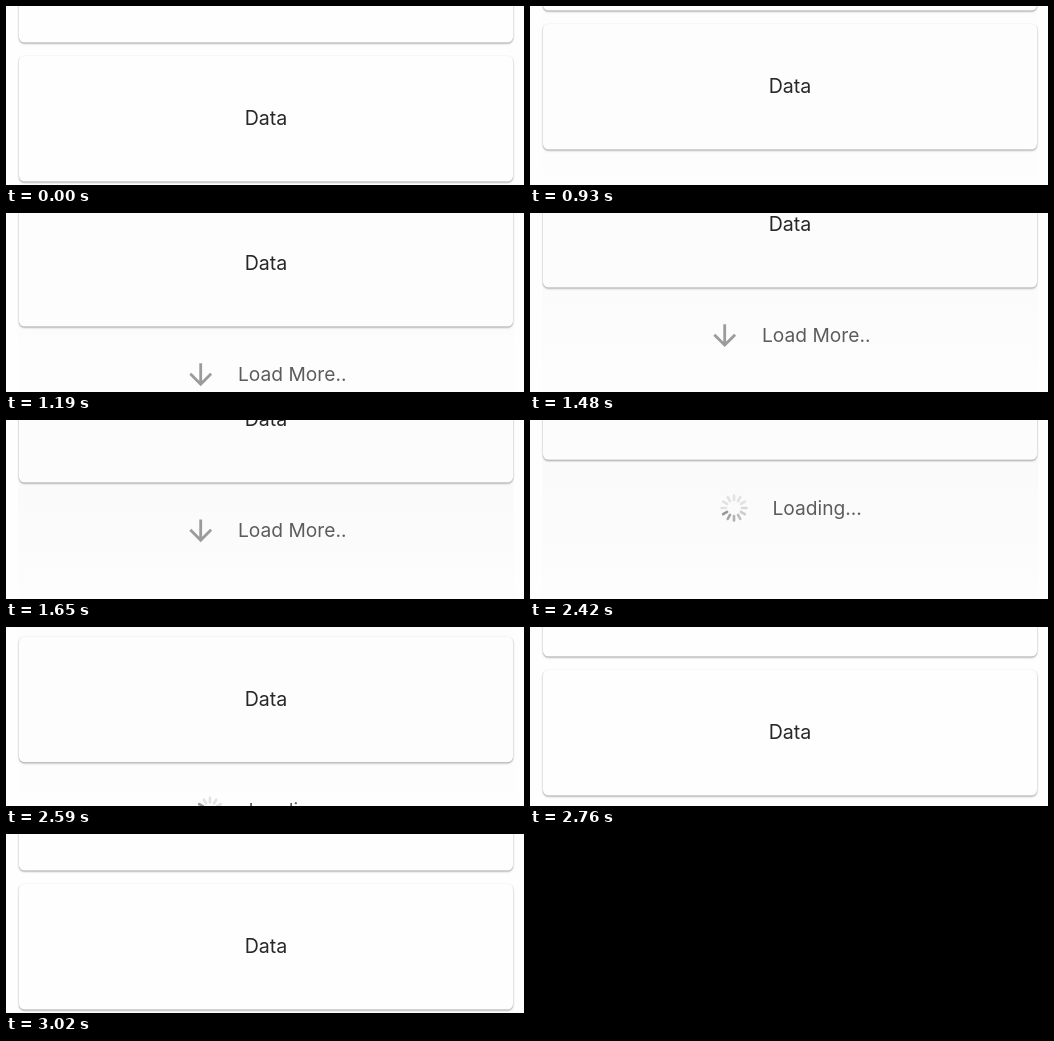
Write an HTML page with a canvas that moves like this. It is 518 px wide and 179 px high and loops after 4820 ms.

```html
<!DOCTYPE html>
<html lang="en">
<head>
<meta charset="utf-8">
<title>Pull to load more</title>
<style>
  html, body { margin: 0; width: 100%; height: 100%; overflow: hidden; background: #fefefe; }
  canvas { display: block; width: 518px; height: 179px; }
</style>
</head>
<body>
<canvas id="stage" width="518" height="179"></canvas>
<script>
const ctx = document.getElementById('stage').getContext('2d');
const W = 518, H = 179, LOOP = 4820;
const CARD = { x: 13, w: 494, h: 125.5, gap: 13.5, bottom: 175.5 };
const PULL = 930, SLOW = 1480, PULLED = 1880, RELEASE = 2420, SETTLE = 2960, REST = 3020;

const snap = (t, start, step) => start + Math.floor((t - start) / step + 1e-6) * step;

// Scroll distance: a slowing drag, a hold, then a critically damped spring back.
function scrollAt(t) {
  if (t < PULL || t >= REST) return 0;
  if (t < RELEASE) {
    const now = t < SLOW ? snap(t, PULL, 55) : snap(Math.min(t, PULLED), SLOW, 400 / 7);
    const d = now - PULL;
    return 32 + 0.1431 * d - 3.205e-5 * d * d;
  }
  const now = t < SETTLE ? snap(t, RELEASE, 170 / 3) : SETTLE;
  const x = 0.235 + 0.01324 * (now - RELEASE);
  return 139 * (1 + x) * Math.exp(-x);
}

function drawCard(bottom) {
  const { x, w, h } = CARD;
  ctx.save();
  ctx.shadowColor = 'rgba(0,0,0,0.4)';
  ctx.shadowBlur = 2;
  ctx.shadowOffsetY = 1;
  ctx.fillStyle = '#fefefe';
  ctx.beginPath();
  ctx.roundRect(x, bottom - h, w, h, 5.5);
  ctx.fill();
  ctx.restore();
}

function text(str, x, y, size, color, align = 'left') {
  ctx.font = `${size}px Inter, "Noto Sans", sans-serif`;
  ctx.textAlign = align;
  ctx.fillStyle = color;
  ctx.fillText(str, x, y);
}

function drawArrow(x, y) {
  ctx.save();
  ctx.translate(x, y);
  ctx.strokeStyle = '#9b9b9b';
  ctx.lineWidth = 2.8;
  ctx.beginPath();
  ctx.moveTo(0, -11.4);
  ctx.lineTo(0, 8);
  ctx.moveTo(-10.4, -1);
  ctx.lineTo(0, 9.4);
  ctx.lineTo(10.4, -1);
  ctx.stroke();
  ctx.restore();
}

function drawSpinner(x, y, elapsed) {
  const head = 8 + Math.floor(elapsed * 12 / 1000);
  ctx.save();
  ctx.translate(x, y);
  ctx.lineWidth = 2.6;
  ctx.lineCap = 'round';
  for (let i = 0; i < 12; i++) {
    const age = (head - i + 24) % 12;
    const shade = Math.min(226, 152 + age * 13);
    ctx.strokeStyle = `rgb(${shade},${shade},${shade})`;
    ctx.save();
    ctx.rotate(i * Math.PI / 6);
    ctx.beginPath();
    ctx.moveTo(0, -8);
    ctx.lineTo(0, -12.5);
    ctx.stroke();
    ctx.restore();
  }
  ctx.restore();
}

// Faint grey tint that deepens with the pull.
function drawTint(bottom, pull) {
  const grey = a => `rgba(0,0,0,${a * pull})`;
  ctx.fillStyle = grey(0.01);
  ctx.fillRect(12, 0, 496, bottom);
  const fade = ctx.createLinearGradient(0, bottom, 0, H);
  fade.addColorStop(0, grey(0.017));
  fade.addColorStop(0.5, grey(0.013));
  fade.addColorStop(1, grey(0.005));
  ctx.fillStyle = fade;
  ctx.fillRect(12, bottom, 496, H - bottom);
}

function draw(t) {
  const scroll = scrollAt(t);
  const bottom = CARD.bottom - scroll;
  const label = bottom + 54.9;
  ctx.fillStyle = '#fefefe';
  ctx.fillRect(0, 0, W, H);
  drawCard(bottom - CARD.h - CARD.gap);
  drawCard(bottom);
  drawTint(bottom, scroll / 139);
  text('Data', 260, bottom - 56.3, 19.6, '#282828', 'center');

  if (t < RELEASE) {
    drawArrow(194.7, bottom + 48.2);
    text('Load More..', 232, label, 19.2, '#5c5c5c');
  } else {
    drawSpinner(204, bottom + 48.2, t - RELEASE);
    text('Loading...', 242.5, label, 19.2, '#5c5c5c');
  }
}

const began = performance.now();
function tick() {
  draw((performance.now() - began) % LOOP);
  requestAnimationFrame(tick);
}
tick();
</script>
</body>
</html>
```
